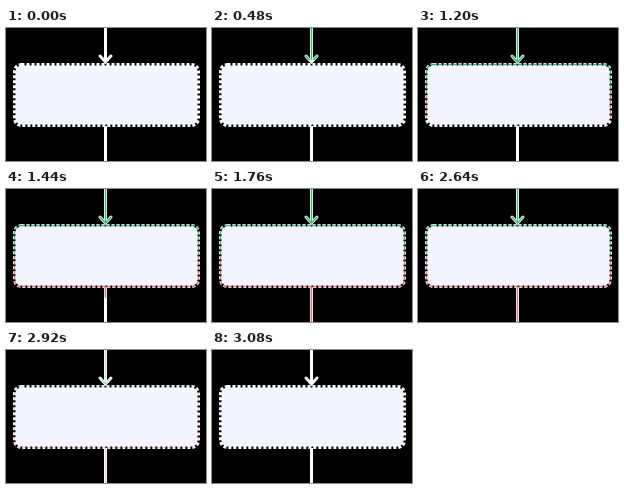
An HTML page with a canvas for the animation above (3.8 s loop, 200 by 133 pixels).

```html
<!DOCTYPE html>
<html lang="en">
<head>
<meta charset="utf-8">
<title>Flow box</title>
<style>
html, body { margin: 0; width: 100%; height: 100%; overflow: hidden; background: #000; }
canvas { display: block; }
</style>
</head>
<body>
<canvas id="stage" width="200" height="133"></canvas>
<script>
const W = 200, H = 133, LOOP = 3800, STEP = 40;
const ctx = document.getElementById('stage').getContext('2d');
const box = { x: 8.5, y: 36.5, w: 184, h: 61, r: 7 };

const tint = ctx.createLinearGradient(0, 0, 0, H);
tint.addColorStop(0, '#2fb574');
tint.addColorStop(0.42, '#35b87a');
tint.addColorStop(0.56, '#d8707c');
tint.addColorStop(1, '#e2646f');

function boxPath() {
  ctx.beginPath();
  ctx.roundRect(box.x, box.y, box.w, box.h, box.r);
}

function strokeFlow(color, width) {
  ctx.strokeStyle = color;
  ctx.lineWidth = width;
  ctx.lineCap = 'butt';
  ctx.lineJoin = 'miter';

  ctx.setLineDash([]);
  ctx.beginPath();
  ctx.moveTo(99.5, 0);
  ctx.lineTo(99.5, 34);
  ctx.moveTo(99.5, 98);
  ctx.lineTo(99.5, H);
  ctx.stroke();

  ctx.lineCap = 'round';
  ctx.beginPath();
  ctx.moveTo(94, 28);
  ctx.lineTo(99.5, 34);
  ctx.lineTo(105, 28);
  ctx.stroke();

  ctx.lineCap = 'butt';
  ctx.setLineDash([3, 2]);
  boxPath();
  ctx.stroke();
  ctx.setLineDash([]);
}

// Height of the colour wipe and its opacity at time t
function reveal(t) {
  if (t < 120 || t >= 3080) return { height: 0, alpha: 0 };
  const fade = Math.max(0, (t - 2600) / STEP);
  return { height: Math.min(H, (t - 80) * 0.08), alpha: 1 - fade / 12 };
}

function draw(time) {
  const t = Math.floor((time % LOOP) / STEP) * STEP;
  const { height, alpha } = reveal(t);

  ctx.fillStyle = '#000';
  ctx.fillRect(0, 0, W, H);
  ctx.fillStyle = '#f4f4fe';
  ctx.beginPath();
  ctx.roundRect(box.x + 1, box.y + 1, box.w - 2, box.h - 2, box.r - 1);
  ctx.fill();
  strokeFlow('#fff', 3);

  if (alpha > 0) {
    ctx.save();
    ctx.beginPath();
    ctx.rect(0, 0, W, height);
    ctx.clip();
    ctx.globalAlpha = alpha;
    strokeFlow(tint, 1.4);
    ctx.restore();
  }
}

let start = null;
function tick(now) {
  if (start === null) start = now;
  draw(now - start);
  requestAnimationFrame(tick);
}
draw(0);
requestAnimationFrame(tick);
</script>
</body>
</html>
```
